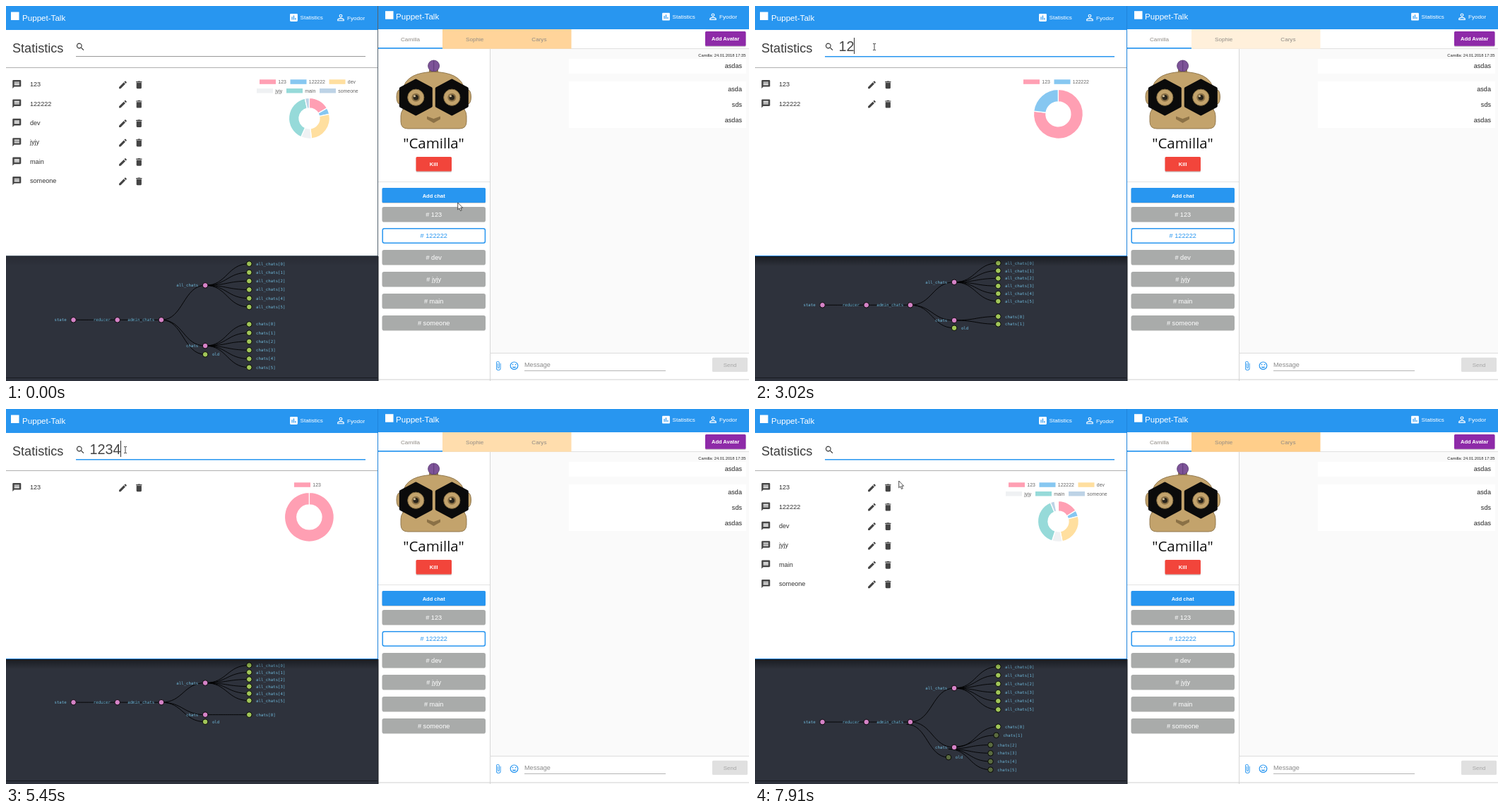
Animation, 1052 px wide and 532 px high, one loop 8 s. Source, as an HTML page:

```html
<!DOCTYPE html>
<html lang="en">
<head>
<meta charset="utf-8">
<title>Chat statistics</title>
<style>
  html, body { margin: 0; width: 100%; height: 100%; overflow: hidden; background: #fff; }
  svg { display: block; width: 100vw; height: 100vh; font-family: "Liberation Sans", Arial, sans-serif; }
  text { white-space: pre; }
  .mono { font-family: "DejaVu Sans Mono", monospace; }
  .name { font-family: "Open Sans", sans-serif; }
</style>
</head>
<body>
<svg id="stage" viewBox="0 0 1052 532" preserveAspectRatio="none">
  <defs>
    <linearGradient id="shade" x2="0" y2="1">
      <stop stop-color="#000" stop-opacity=".45"/>
      <stop offset="1" stop-color="#000" stop-opacity="0"/>
    </linearGradient>
    <clipPath id="panel"><rect y="355" width="526" height="172"/></clipPath>
  </defs>
</svg>
<script>
const BLUE = '#2896f0';
const ICONS = {
  message: 'M20 2H4c-1.1 0-2 .9-2 2v18l4-4h14c1.1 0 2-.9 2-2V4c0-1.1-.9-2-2-2zm-2 12H6v-2h12v2zm0-3H6V9h12v2zm0-3H6V6h12v2z',
  edit: 'M3 17.25V21h3.75L17.81 9.94l-3.75-3.75L3 17.25zM20.71 7.04c.39-.39.39-1.02 0-1.41l-2.34-2.34c-.39-.39-1.02-.39-1.41 0l-1.83 1.83 3.75 3.75 1.83-1.83z',
  trash: 'M6 19c0 1.1.9 2 2 2h8c1.1 0 2-.9 2-2V7H6v12zM19 4h-3.5l-1-1h-5l-1 1H5v2h14V4z',
  search: 'M15.5 14h-.8l-.3-.3A6.5 6.5 0 1 0 13.7 14.4l.3.3v.8l5 5L20.5 19l-5-5zm-6 0a4.5 4.5 0 1 1 0-9 4.5 4.5 0 0 1 0 9z',
  stats: 'M19 3H5c-1.1 0-2 .9-2 2v14c0 1.1.9 2 2 2h14c1.1 0 2-.9 2-2V5c0-1.1-.9-2-2-2zM9 17H7v-7h2v7zm4 0h-2V7h2v10zm4 0h-2v-4h2v4z',
  person: 'M12 5.9a2.1 2.1 0 1 1 0 4.2 2.1 2.1 0 0 1 0-4.2m0 9c2.97 0 6.1 1.46 6.1 2.1v1.1H5.9V17c0-.64 3.13-2.1 6.1-2.1M12 4a4 4 0 1 0 0 8 4 4 0 0 0 0-8zm0 9c-2.67 0-8 1.34-8 4v3h16v-3c0-2.66-5.33-4-8-4z',
  clip: 'M16.5 6v11.5a4 4 0 0 1-8 0V5a2.5 2.5 0 0 1 5 0v10.5a1 1 0 0 1-2 0V6H10v9.5a2.5 2.5 0 0 0 5 0V5a4 4 0 0 0-8 0v12.5a5.5 5.5 0 0 0 11 0V6h-1.5z'
};
const CHATS = ['123', '122222', 'dev', 'jyjy', 'main', 'someone'];
const COUNTS = [10, 3, 16, 5, 24, 2];
const COLORS = ['#ff9fb3', '#86c7f1', '#ffdf9f', '#eff1f3', '#96dad9', '#bdd3e6'];

const stage = document.getElementById('stage');
const set = (el, attrs) => { for (const k in attrs) el.setAttribute(k, attrs[k]); return el; };
const add = (tag, attrs, parent = stage) =>
  parent.appendChild(set(document.createElementNS('http://www.w3.org/2000/svg', tag), attrs));
const box = (x, y, width, height, fill, more, parent) =>
  add('rect', { x, y, width, height, fill, ...more }, parent);
const path = (d, attrs, parent) => add('path', { d, ...attrs }, parent);
// Text centred vertically on y.
const label = (x, y, str, size, fill, more, parent) => {
  const el = add('text', { x, y: y + size * .36, 'font-size': size, fill, ...more }, parent);
  el.textContent = str;
  return el;
};
const icon = (name, cx, cy, fill, parent, scale = .6) =>
  path(ICONS[name], { fill, transform: `translate(${cx} ${cy}) scale(${scale}) translate(-12 -12)` }, parent);
const MID = { 'text-anchor': 'middle' }, END = { 'text-anchor': 'end' };
const BOLD = { ...MID, 'font-weight': 'bold' };
const show = (el, on) => el.setAttribute('visibility', on ? 'visible' : 'hidden');
const lerp = (a, b, k) => a + (b - a) * k;
const mix = (a, b, k) => `rgb(${a.map((v, i) => Math.round(lerp(v, b[i], k)))})`;

// Tree panel
box(0, 354, 528, 178, '#2e323c');
box(0, 527, 528, 1, '#191c22');
const tree = add('g', { 'clip-path': 'url(#panel)' });
const links = add('g', { fill: 'none', stroke: '#000', 'stroke-width': .9 }, tree);
const nodes = Array.from({ length: 18 }, () => {
  const g = add('g', {}, tree);
  return {
    g,
    link: add('path', {}, links),
    dot: add('circle', { r: 3.8, stroke: '#000', 'stroke-width': .9 }, g),
    text: add('text', { class: 'mono', 'font-size': 5.73, fill: '#6fb8da', y: 2 }, g)
  };
});
const winShade = box(0, 355, 527, 14, 'url(#shade)');

// Header shared by both windows
function header(x, w, h, cy, statsX, userX) {
  box(x, 0, w, h, BLUE);
  const left = x ? 537 : 7;
  box(left, cy - 8, 11.5, 11.5, '#fff');
  label(x ? 552 : 23, cy, 'Puppet-Talk', 11.6, '#fff');
  icon('stats', statsX, cy, '#fff');
  label(statsX + 9, cy - .2, 'Statistics', 8.1, '#fff');
  icon('person', userX, cy, '#fff');
  label(userX + 9, cy + .3, 'Fyodor', 8.1, '#fff');
}

// Left window
box(0, 0, 526, 354, '#fff');
header(0, 526, 34, 16.5, 407.5, 474);
label(9, 59, 'Statistics', 18.1, '#3c3c3c');
icon('search', 105.3, 58, '#333');
const line = box(99, 71, 410, 1, '#999');
box(0, 87, 526, 1, '#b0b0b0');
const query = label(118.5, 57, '', 19.8, '#444');
const caret = box(118, 45, 1, 23, '#333');
const rows = CHATS.map((name, i) => {
  const g = add('g', { transform: `translate(0 ${i * 27.4})` });
  icon('message', 15.3, 111, '#444', g);
  label(34, 111, name, 9.1, '#333', {}, g);
  icon('edit', 165.5, 111.8, '#444', g);
  icon('trash', 188.3, 111.8, '#444', g);
  return g;
});
const LEGEND = { 6: [359, 402.5, 457.5, 355, 397, 444], 2: [380, 423.5], 1: [408], 0: [] };
const legend = CHATS.map((name, i) => {
  const g = add('g', {});
  box(0, 0, 23, 6.5, COLORS[i], {}, g);
  label(26.3, 3.3, name, 6.9, '#666', {}, g);
  return g;
});
const arcs = COLORS.map(fill => path('', { fill, stroke: '#fff', 'stroke-width': 1.3 }));

// Right window
box(527, 0, 525, 532, '#fff');
header(527, 525, 33, 15.2, 934.5, 1001);
box(685, 61, 367, 432, '#fafafa');
box(618, 60, 434, 1, '#e0e0e0');
const tabs = box(618, 33, 182.5, 27.7, '#fff');
['Camilla', 'Sophie', 'Carys'].forEach((name, i) =>
  label(572.5 + 91.2 * i, 47, name, 8.1, '#8f8a84', MID));
box(527, 59, 91, 1.7, BLUE);
box(990, 37, 57.5, 21, '#000', { rx: 1.5, opacity: .18 });
box(990, 36, 57.5, 20.7, '#8e2aa8', { rx: 1.5 });
label(1018.7, 46.3, 'Add Avatar', 7.5, '#fff', BOLD);

// Robot portrait
path('M599 90h13v8h-13z', { fill: '#8d7650' });
add('circle', { cx: 605.6, cy: 85, r: 8, fill: '#7d5398', stroke: '#593a70', 'stroke-width': .8 });
path('M605.6 77v16', { stroke: '#643f7e', 'stroke-width': 1.2 });
const SKIN = { fill: '#c3a36c', stroke: '#8b7146', 'stroke-width': .9 };
for (const cx of [557, 654.5]) add('ellipse', { cx, cy: 129, rx: 4, ry: 10, ...SKIN });
path('M562 152V120Q563 106 577 99Q589 93.500 605.500 93.500Q622 93.500 634 99Q648 106 649 120V152z', SKIN);
path('M562 147h87q3 4 3 9v8q0 10-10 10h-73q-10 0-10-10v-8q0-5 3-9z', SKIN);
path('M563 144h85v6h-85z', { fill: '#c3a36c' });
for (const cx of [580.3, 631.3]) {
  path(`M${cx} 105.500l21.500 11.500v25l-21.500 11.500l-21.500-11.500v-25z`,
    { fill: '#0b0b0b', stroke: '#0b0b0b', 'stroke-width': 4, 'stroke-linejoin': 'round' });
  add('circle', { cx, cy: 129.7, r: 11.6, fill: '#c3a36c', stroke: '#7e683e', 'stroke-width': 1 });
  add('circle', { cx, cy: 129.7, r: 6, fill: '#8b7146' });
  add('circle', { cx, cy: 129.7, r: 3.8, fill: '#2a251c' });
  add('circle', { cx: cx - 1.8, cy: 127.7, r: 1.5, fill: '#d8c59c' });
}
path('M596 156.500l9.500 3.500l9.500-3.500v4l-9.500 5.500l-9.500-5.500z', { fill: '#8b7146' });

label(605.5, 195, '"Camilla"', 20.5, '#111', { ...MID, class: 'name' });
box(580.5, 215, 50.5, 21, '#000', { rx: 1.5, opacity: .18 });
box(580.5, 214, 50.5, 20.5, '#f2453b', { rx: 1.5 });
label(605.7, 224.2, 'Kill', 7.5, '#fff', BOLD);
box(527, 249, 158, 1, '#e4e4e4');
box(685, 61, 1, 471, '#d6d6d6');
box(532.5, 259.5, 146.5, 20.5, '#000', { rx: 1.5, opacity: .18 });
box(532.5, 258, 146.5, 21, BLUE, { rx: 1.5 });
label(605.7, 268.8, 'Add chat', 7.5, '#fff', BOLD);
CHATS.forEach((name, i) => {
  const y = Math.round(284.5 + i * 30.85), picked = i === 1;
  if (picked) box(533.2, y + .8, 145.2, 20.4, '#fff', { rx: 2.5, stroke: BLUE, 'stroke-width': 1.5 });
  else box(532.5, y, 146.5, 21.5, '#a9abaa', { rx: 2.8 });
  label(605.7, y + 10.6, '# ' + name, 9.2, picked ? BLUE : '#fff', MID);
});

// Messages
label(1047.5, 69.8, 'Camilla: 24.01.2018 17:35', 5.75, '#222', END);
box(797, 75, 251, 21, '#fff');
box(797, 107, 251, 66, '#fff');
['asdas', 'asda', 'sds', 'asdas'].forEach((str, i) =>
  label(1042, [85, 117.3, 139.6, 161.9][i], str, 9.1, '#222', END));
box(685, 492, 367, 1, '#dcdcdc');
box(686, 493, 366, 39, '#fff');
box(527, 529.5, 525, 1, '#cfcfcf');
icon('clip', 697, 510.5, BLUE);
add('circle', { cx: 719.5, cy: 510.3, r: 5.3, fill: 'none', stroke: BLUE, 'stroke-width': 1.2 });
path('M716.6 511.7a3.2 3.2 0 0 0 5.8 0z', { fill: BLUE });
for (const cx of [717.5, 721.5]) add('circle', { cx, cy: 508.6, r: .9, fill: BLUE });
label(734, 509, 'Message', 9.1, '#8a8a8a');
box(734, 517, 200, 1, '#b5b5b5');
box(1000, 498.7, 50, 20.3, '#e0e0e0', { rx: 1.5 });
label(1025, 508.8, 'Send', 8, '#a6a6a6', MID);

// Window frame and pointer
box(526, 355, 1.5, 177, '#22262d');
const frame = path('M0 354.5H526.5V0', { fill: 'none', 'stroke-width': 1 });
const arrow = path('M0 0v9.8l2.2-2 1.6 3.7 1.7-.8-1.6-3.5h3z',
  { fill: '#fff', stroke: '#222', 'stroke-width': .8 });
const beam = path('M167 53.5h1.5l.5.5.5-.5h1.5M169 54v8M167 62.5h1.5l.5-.5.5.5h1.5',
  { fill: 'none', stroke: '#333', 'stroke-width': .9 });

// Tree layout: top row and row pitch for each number of matching chats
const SPACING = { 6: [365.7, 12.25], 2: [364.7, 10.83], 1: [363.5, 10.03], 0: [360.8, 14.25] };
const ENTRY = { x: 95.5, y: 490 };
const HUB = 10;
function layout(n) {
  const [top, pitch] = SPACING[n];
  const hub = n ? 7 + (n - 1) / 2 : 3.5, mid = (3.5 + hub) / 2;
  const at = (depth, row, name, parent) =>
    ({ x: 95.5 + depth * 62.2, y: top + row * pitch, name, parent });
  const list = [at(0, mid, 'state', 0), at(1, mid, 'reducer', 0), at(2, mid, 'admin_chats', 1), at(3, 2.5, 'all_chats', 2)];
  for (let i = 0; i < 6; i++) list.push(at(4, i, `all_chats[${i}]`, 3));
  list.push(at(3, hub, 'chats', 2));
  for (let i = 0; i < n; i++) list.push(at(4, 7 + i, `chats[${i}]`, HUB));
  list.push(at(3, hub + 1, 'old', 2));
  list.forEach((d, i) => d.leaf = !list.some((c, j) => j && c.parent === i));
  return list;
}

function drawTree(from, to, u) {
  const k = u < .5 ? 4 * u ** 3 : 1 - 4 * (1 - u) ** 3;
  const a = layout(from), b = layout(to);
  const between = (p, q) => ({ x: lerp(p.x, q.x, k), y: lerp(p.y, q.y, k) });
  nodes.forEach((node, i) => {
    const p = a[i], q = b[i], d = q || p;
    const on = !!d && (!!q || u < 1);
    show(node.g, on);
    show(node.link, on && i > 0);
    if (!on) return;
    const pos = between(p || ENTRY, q || b[HUB]);
    const src = between(p ? a[p.parent] : ENTRY, q ? b[q.parent] : b[HUB]);
    const mx = (src.x + pos.x) / 2;
    const fresh = q && (!p || p.name !== q.name);
    const fade = !q ? 1 - k : 1;
    set(node.link, { d: `M${src.x} ${src.y}C${mx} ${src.y} ${mx} ${pos.y} ${pos.x} ${pos.y}`, opacity: fade });
    set(node.g, { transform: `translate(${pos.x} ${pos.y})`, opacity: fade });
    const base = d.leaf ? [161, 198, 89] : [213, 131, 199];
    set(node.dot, { fill: mix(base, [46, 50, 48], fresh ? .95 * Math.sin(Math.PI * u) : 0) });
    set(node.text, { x: d.leaf ? 9.8 : -9.8, 'text-anchor': d.leaf ? 'start' : 'end', opacity: p ? 1 : k });
    node.text.textContent = d.name;
  });
}

function drawChart(n, u) {
  const grow = 1 - (1 - u) ** 4;
  const total = COUNTS.slice(0, n).reduce((s, c) => s + c, 0);
  const cy = n > 3 ? 159.4 : 153.3, R = n > 3 ? 29 : 35;
  const pt = (r, a) => `${429.4 + r * Math.sin(a)} ${cy - r * Math.cos(a)}`;
  let a0 = 0;
  arcs.forEach((arc, i) => {
    show(arc, i < n);
    show(legend[i], i < n);
    if (i >= n) return;
    const a1 = a0 + Math.min(COUNTS[i] / total * grow * 2 * Math.PI, 6.283);
    const big = a1 - a0 > Math.PI ? 1 : 0;
    set(arc, { d: `M${pt(R, a0)}A${R} ${R} 0 ${big} 1 ${pt(R, a1)}L${pt(R / 2, a1)}A${R / 2} ${R / 2} 0 ${big} 0 ${pt(R / 2, a0)}Z` });
    set(legend[i], { transform: `translate(${LEGEND[n][i]} ${i < 3 ? 104.3 : 117})` });
    a0 = a1;
  });
}

// Timeline: the picture advances in ticks of about a fifth of a second
const TICK = 203, LOOP = 8000;
const RESULTS = [[-2000, 6], [2180, 2], [3865, 1], [5480, 0], [6205, 1], [7328, 6]];
const KEYS = [[4, ''], [9, '1'], [10, '12'], [18, '123'], [26, '1234'], [30, '123'], [33, '12'], [34, '1'], [35, '']];
const FOCUS = 4;

function pointer(n) {
  if (n < 3) { const k = n / 3; return [lerp(639.7, 169, k), lerp(279, 58, k)]; }
  if (n > 37) { const k = (n - 37) / 2; return [lerp(169, 203.7, k), lerp(58, 102, k)]; }
  return null;
}

function draw(n) {
  const t = n * TICK - 5;
  const step = RESULTS.findLastIndex(r => r[0] <= t);
  const [began, count] = RESULTS[step];
  const before = RESULTS[Math.max(0, step - 1)][1];
  drawTree(before, count, Math.min(1, (t - began) / 750));
  drawChart(count, Math.min(1, (t - began) / 1000));
  rows.forEach((row, i) => show(row, i < count));

  const focused = n >= FOCUS;
  const [keyTick, str] = KEYS.findLast(k => k[0] <= n) || KEYS[0];
  query.textContent = str;
  set(caret, { x: Math.round(118 + str.length * 11.1) });
  show(caret, focused && Math.floor((n - keyTick) * TICK / 500) % 2 === 0);
  set(line, { fill: focused ? BLUE : '#999', height: focused ? 1.5 : 1 });
  set(frame, { stroke: focused ? '#1f84dc' : '#55636f' });
  set(winShade, { opacity: focused ? 1 : .3 });

  const wave = (1 + Math.cos(Math.PI * (t / 1000 - 1.68))) / 2;
  set(tabs, { fill: mix([255, 255, 255], [255, 200, 124], .11 + .95 * wave ** 1.4) });

  const pos = pointer(n);
  show(arrow, pos);
  show(beam, !pos);
  if (pos) set(arrow, { transform: `translate(${pos})` });
}

let start, last = -1;
function loop(now) {
  start ??= now;
  const n = Math.floor(((now - start) % LOOP + 28) / TICK);
  if (n !== last) draw(last = n);
  requestAnimationFrame(loop);
}
draw(0);
requestAnimationFrame(loop);
</script>
</body>
</html>
```
